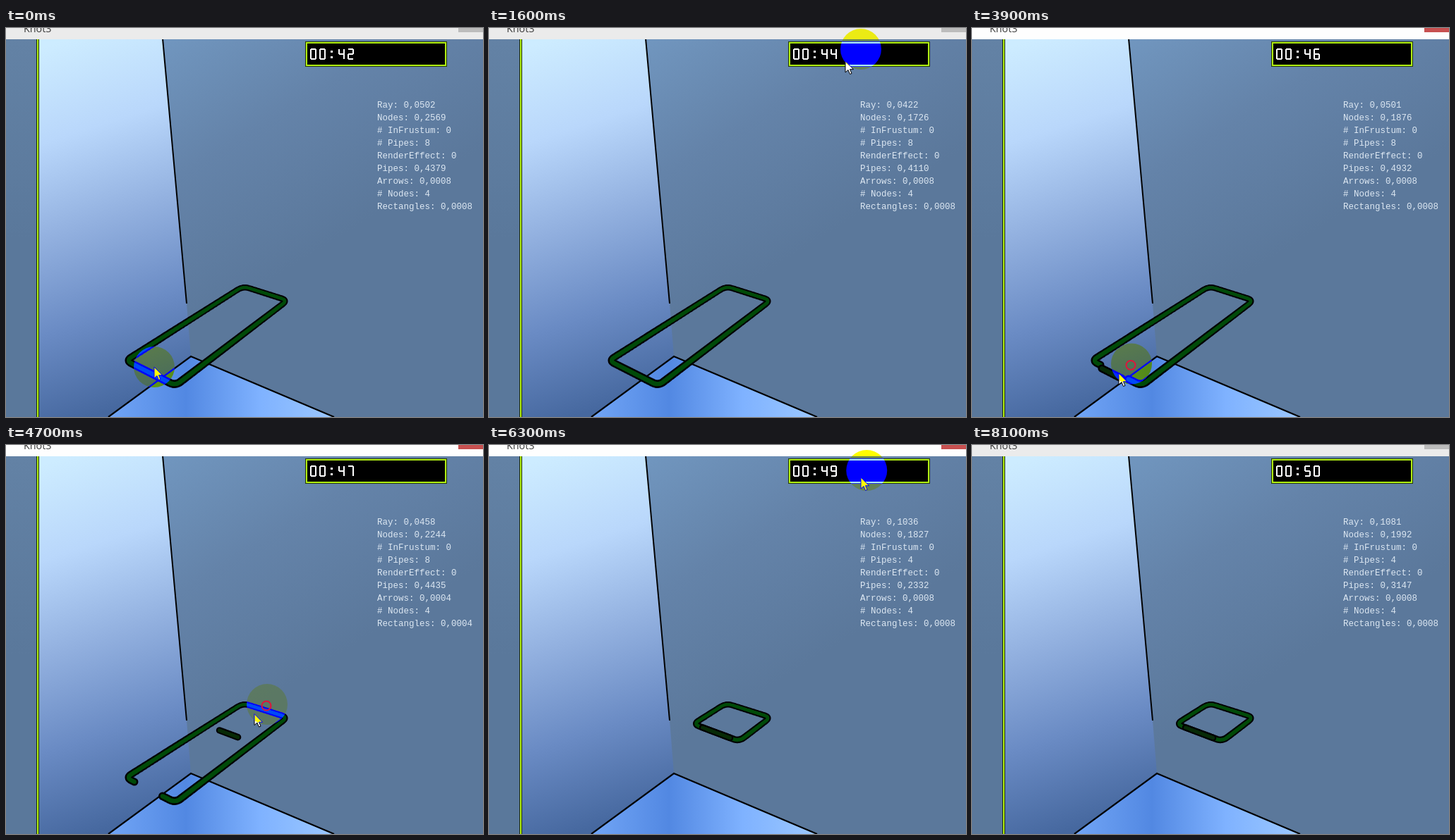
An HTML page with a canvas that plays this animation: 676 px wide and 552 px high, repeating every 8200 ms.

```html
<!DOCTYPE html>
<html lang="en">
<head>
<meta charset="utf-8">
<title>Knot3</title>
<style>
html, body { margin: 0; height: 100%; overflow: hidden; background: #5b789b; }
canvas { display: block; }
</style>
</head>
<body>
<canvas id="stage" width="676" height="552"></canvas>
<script>
const g = document.getElementById('stage').getContext('2d');
const LOOP = 8200, STEP = 100, PRESS = 3800, DROP = 5000;
const GREEN = '#004a08', DARK = '#072a06', HOVER = '#5a6e14', LIME = '#b0ee14';

// Turning points of the mouse: time, x, y.
const MOUSE = [
  [0, 210, 481], [1000, 208, 490], [1500, 505, 47], [1600, 527, 30],
  [2100, 545, -40], [2600, 346, 368], [3100, 208, 490], [PRESS, 208, 490],
  [4700, 370, 368], [5500, 383, 418], [6200, 527, 46], [6600, 560, 6], [7200, 600, 600]
];

const mix = (a, b, k) => a.map((v, i) => v + (b[i] - v) * k);
const random = n => { const s = Math.sin(n * 12.9898) * 43758.5453; return s - Math.floor(s); };

function mouseAt(t) {
  const i = MOUSE.findIndex(k => k[0] > t);
  if (i < 1) return MOUSE[i ? MOUSE.length - 1 : 0].slice(1);
  const a = MOUSE[i - 1], b = MOUSE[i];
  return mix(a, b, (t - a[0]) / (b[0] - a[0])).slice(1);
}

function poly(points, fill) {
  g.beginPath();
  points.forEach(p => g.lineTo(...p));
  g.closePath();
  g.fillStyle = fill;
  g.fill();
}

function line(points, color, width) {
  g.beginPath();
  points.forEach(p => g.lineTo(...p));
  g.strokeStyle = color;
  g.lineWidth = width;
  g.stroke();
}

function box(x, y, w, h, fill) {
  g.fillStyle = fill;
  g.fillRect(x, y, w, h);
}

// Linear gradient with evenly spaced colours.
function shade(x0, y0, x1, y1, ...colors) {
  const s = g.createLinearGradient(x0, y0, x1, y1);
  colors.forEach((c, i) => s.addColorStop(i / (colors.length - 1), c));
  return s;
}

function room() {
  const corner = [262, 466], left = [145, 552], right = [465, 552];
  box(0, 0, 676, 552, shade(215, 0, 420, 330, '#7298c1', '#6483a9', '#5b789b'));
  box(0, 0, 43, 552, shade(0, 15, 0, 300, '#6382a5', '#5a789b'));
  poly([[47, 15], [222, 15], [256, 391], corner, left, [47, 552]],
    shade(90, 15, 250, 510, '#cdecff', '#b9d7fb', '#92b0df', '#6a8bc4', '#46689f'));
  poly([corner, left, right], shade(150, 0, 465, 0, '#70a4f5', '#5288e2', '#7fb2ff', '#9cc8ff'));
  line([[222, 15], [256, 391]], '#000', 2);
  line([left, corner, right], '#000', 2.2);
  box(43, 15, 4, 537, '#1c2c10');
  box(44, 15, 2, 537, LIME);
}

// Points about a pixel apart along a polyline with rounded corners.
function trace(pts) {
  const out = [];
  const walk = (a, b) => {
    const n = Math.ceil(Math.hypot(b[0] - a[0], b[1] - a[1]));
    for (let i = 0; i <= n; i++) out.push(mix(a, b, i / n));
  };
  const toward = (a, b) => mix(a, b, 9 / Math.hypot(b[0] - a[0], b[1] - a[1]));
  let from = pts[0];
  for (let i = 1; i < pts.length - 1; i++) {
    const c = pts[i], a = toward(c, pts[i - 1]), b = toward(c, pts[i + 1]);
    walk(from, a);
    for (let k = 0; k <= 1; k += 0.1) out.push(mix(mix(a, c, k), mix(c, b, k), k));
    from = b;
  }
  walk(from, pts[pts.length - 1]);
  return out;
}

// Nearer parts, lower on the screen, are thicker.
function pipe(pts, color) {
  const path = trace(pts);
  for (const [fill, size] of [['#000', 1], [color, 0.54]]) {
    g.beginPath();
    for (const [x, y] of path) {
      const r = (4.3 + (y - 370) / 85) * size;
      g.moveTo(x + r, y);
      g.arc(x, y, r, 0, 7);
    }
    g.fillStyle = fill;
    g.fill();
  }
}

function knot(t) {
  const farL = [336, 366.5], farR = [399, 386.5];
  // Ends of the near edge after moving some grid cells inwards.
  const edge = cells => [mix([170, 472], farL, 0.36 * cells), mix([240, 507.5], farR, 0.36 * cells)];
  const done = t >= DROP, dragging = t >= PRESS && !done;
  const [l, r] = edge(done ? 2 : 0);
  const [gapL, gapR] = dragging ? [0.17, 0.74] : [0.5, 0.5];
  pipe([mix(l, r, gapL), l, farL, farR, r, mix(l, r, gapR)], GREEN);

  if (dragging) {
    const [a, b] = edge(Math.min(2, Math.round((t - PRESS) / 400)));
    pipe([mix(a, b, 0.2), mix(a, b, 0.6)].map(([x, y]) => [x, y + 4]), DARK);
  } else if (done) {
    pipe([mix(l, r, 0.2), mix(l, r, 0.8)], DARK);
  } else if (t >= 300 && Math.hypot(...mix(mouseAt(t), [208, 490], 2).map((v, i) => v - [208, 490][i])) < 9) {
    pipe([mix(l, r, 0.22), mix(l, r, 0.86)], HOVER);
  }
}

// Bit i lights part i: top, upper right, lower right, bottom, lower left, upper left, middle.
const LIT = [63, 6, 91, 79, 102, 109, 125, 7, 127, 111];

function digit(n, x, y) {
  const rim = [[0, 0], [7, 0], [7, 7], [7, 14], [0, 14], [0, 7]];
  for (let i = 0; i < 7; i++) {
    const ends = i < 6 ? [rim[i], rim[(i + 1) % 6]] : [rim[5], rim[2]];
    if (LIT[n] >> i & 1) line(ends.map(p => [x + p[0], y + p[1]]), '#fff', 2);
  }
}

function clock(t) {
  box(424, 19, 201, 36, '#24380c');
  box(425, 20, 199, 34, LIME);
  box(427, 22, 195, 30, '#000');
  const s = Math.floor(42.8 + t / 1000);
  [...('00:' + s)].forEach((c, i) => {
    const x = Math.round(432 + 13.2 * i);
    if (c !== ':') return digit(+c, x, 30);
    box(x + 2, 32, 3, 3, '#fff');
    box(x + 2, 40, 3, 3, '#fff');
  });
}

function stats(t) {
  const some = (k, low, span) =>
    (low + span * random(t / STEP + 97 * k)).toFixed(4).replace('.', ',');
  const tick = k => random(t / STEP + 97 * k) < 0.4 ? '0,0004' : '0,0008';
  const pipes = t < DROP ? 8 : 4;
  g.font = '12.5px "Liberation Mono", monospace';
  g.fillStyle = '#dce7f2';
  [
    'Ray: ' + some(1, 0.04, 0.07),
    'Nodes: ' + some(2, 0.14, 0.12),
    '# InFrustum: 0',
    '# Pipes: ' + pipes,
    'RenderEffect: 0',
    'Pipes: ' + some(3, pipes * 0.045, 0.15),
    'Arrows: ' + tick(4),
    '# Nodes: 4',
    'Rectangles: ' + tick(5)
  ].forEach((s, i) => g.fillText(s, 526, 113 + 18 * i));
}

function titleBar(t) {
  const active = t >= 2000 && t < 7600;
  box(0, 0, 676, 16, active ? '#fefefe' : '#ebebeb');
  box(641, 0, 35, 6, active ? '#c75050' : '#bcbcbc');
  g.font = '14.3px "Open Sans", sans-serif';
  g.fillStyle = '#3a3a3a';
  g.fillText('Knot3', 25, 6);
}

function mouse(t) {
  // The arrow trails the halo by one step.
  const [hx, hy] = mouseAt(t), [x, y] = mouseAt(t - STEP);
  const arrow = [[0, 0], [0, 16], [4, 12.5], [6.5, 18.5], [9, 17.5], [6.5, 11.7], [11.5, 11.7], [0, 0]]
    .map(p => [x + p[0], y + p[1]]);
  poly(arrow, '#fff');
  line(arrow, '#000', 1);

  // The halo inverts the blue channel.
  g.globalCompositeOperation = 'difference';
  g.beginPath();
  g.arc(hx, hy, 29, 0, 7);
  g.fillStyle = '#00f';
  g.fill();
  g.globalCompositeOperation = 'source-over';

  if (t >= PRESS && t < DROP) {
    g.beginPath();
    g.arc(hx - 1, hy + 2, 6.5, 0, 7);
    g.strokeStyle = '#e0143c';
    g.lineWidth = 2;
    g.stroke();
  }
}

function draw() {
  const t = Math.floor((performance.now() - start) % LOOP / STEP) * STEP;
  room();
  knot(t);
  clock(t);
  stats(t);
  titleBar(t);
  mouse(t);
  requestAnimationFrame(draw);
}

const start = performance.now();
draw();
</script>
</body>
</html>
```
